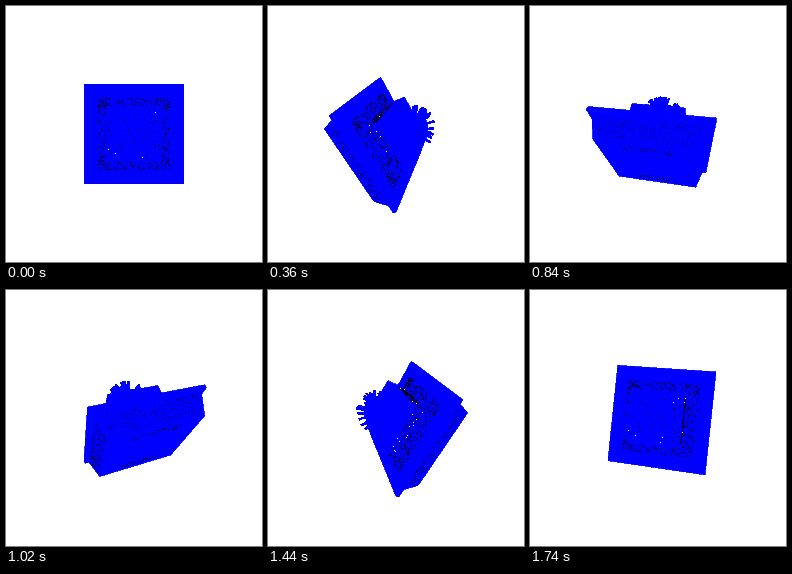
An HTML page for the animation above (1.8 s loop, 256x256 px).

```html
<!DOCTYPE html>
<html>
<head>
<meta charset="utf-8">
<style>
html, body { margin: 0; width: 100%; height: 100%; overflow: hidden; background: #fff; }
svg { display: block; width: 100%; height: 100%; }
</style>
</head>
<body>
<svg viewBox="0 0 256 256" shape-rendering="crispEdges"></svg>
<script>
const LOOP = 1800, STEP = 60, CAMERA = 220, FOCAL = 231;
const AXIS_Y = Math.sqrt(3) / 2, AXIS_Z = 0.5;
const BLUE = '#00f', DIM = '#0000b0', DARK = '#000060', BLACK = '#000', WHITE = '#fff';
const svg = document.querySelector('svg');

let seed = 7;
function random(lo = 0, hi = 1) {
  seed = (seed * 1664525 + 1013904223) >>> 0;
  return lo + (hi - lo) * seed / 4294967296;
}
const repeat = (count, make) => Array.from({ length: count }, (_, i) => make(i));

// Turn a point about the tilted axis (0, AXIS_Y, AXIS_Z).
function turn([x, y, z], angle) {
  const c = Math.cos(angle), s = Math.sin(angle);
  const along = (1 - c) * (AXIS_Y * y + AXIS_Z * z);
  return [
    c * x + s * (AXIS_Y * z - AXIS_Z * y),
    c * y + s * AXIS_Z * x + along * AXIS_Y,
    c * z - s * AXIS_Y * x + along * AXIS_Z
  ];
}
function project(point, angle) {
  const [x, y, z] = turn(point, angle);
  const k = FOCAL / (CAMERA - z);
  return [128 + x * k, 128 - y * k];
}

const square = (half, z) => [[half, half, z], [-half, half, z], [-half, -half, z], [half, -half, z]];
const ring = (radius, z) => repeat(12, i => [radius * Math.cos(i * Math.PI / 6), radius * Math.sin(i * Math.PI / 6), z]);
const quarter = ([x, y, z], n) => n ? quarter([-y, x, z], n - 1) : [x, y, z];

function hull(points) {
  const sorted = points.slice().sort((a, b) => a[0] - b[0] || a[1] - b[1]);
  const half = list => {
    const out = [];
    for (const p of list) {
      while (out.length > 1) {
        const [a, b] = out.slice(-2);
        if ((b[0] - a[0]) * (p[1] - a[1]) - (b[1] - a[1]) * (p[0] - a[0]) > 0) break;
        out.pop();
      }
      out.push(p);
    }
    return out.slice(0, -1);
  };
  return [...half(sorted), ...half(sorted.reverse())];
}

const fmt = p => p.map(v => v.toFixed(2)).join(' ');

function solid(points) {
  return angle => {
    const d = 'M' + hull(points.map(p => project(p, angle))).map(fmt).join('L') + 'Z';
    return `<path d="${d}" fill="${BLUE}" stroke="${BLUE}" stroke-width=".8"/>`;
  };
}

// Specks show only while their face is turned far enough towards the camera.
function specks(normal, offset, points, palette, minFacing = 0) {
  const colors = points.map(() => palette[Math.floor(random(0, palette.length))]);
  return angle => {
    const facing = turn(normal, angle)[2];
    if (facing < minFacing || CAMERA * facing <= offset) return '';
    return [...new Set(palette)].map(color => {
      const d = points.filter((_, i) => colors[i] === color)
        .map(p => `M${project(p, angle).map(Math.floor).join(' ')}h1v1h-1z`).join('');
      return `<path d="${d}" fill="${color}"/>`;
    }).join('');
  };
}

function walls(count, make, offset, palette) {
  return repeat(4, n => specks(quarter([1, 0, 0], n), offset,
    repeat(count, () => quarter(make(), n)), palette));
}

function twigs(count) {
  const lines = repeat(count, () => {
    const a = random(0, Math.PI * 2), lift = random(0.15, 1), r = Math.sqrt(1 - lift * lift);
    const at = (k, turnBy = 0) => [22 * k * r * Math.cos(a + turnBy), 22 * k * r * Math.sin(a + turnBy), 15 + 25 * lift * k];
    return [at(0.5), at(0.85), at(1, random(-0.2, 0.2))];
  });
  return angle => {
    const d = lines.map(l => 'M' + l.map(p => fmt(project(p, angle))).join('L')).join('');
    return `<path d="${d}" fill="none" stroke="${BLUE}" stroke-width="2.6"/>`;
  };
}

const UP = [0, 0, 1], DOWN = [0, 0, -1];
const SHADE = [DIM, DIM, DARK], DEEP = [DIM, DARK, DARK, BLACK];
const GAPS = repeat(18, i => i ? [BLACK, DARK, DIM][i % 3] : WHITE);

const bandDots = repeat(640, i => quarter([random(25, 36), random(-36, 36), -10], i % 4));
const roofDots = repeat(110, () => [random(-23, 23), random(-23, 23), 15]);
const underDots = repeat(90, i => [random(-22, 22), random(26, 35) * (i % 2 ? 1 : -1), -33]);

function slopeDot() {
  const z = random(-31, -15);
  return [46 + (z + 13) * 0.27, random(-40, 40), z];
}

// Groups run from the lowest to the highest part of the model.
const groups = [
  [solid([...square(46, -13), ...square(40.5, -33.3)]),
   ...walls(260, slopeDot, 46, SHADE),
   specks(DOWN, 33, underDots, DEEP)],
  [solid([...square(49.5, -10), ...square(49.5, -13)]),
   specks(UP, -10, bandDots, DEEP)],
  [solid([...square(24.4, -10), ...square(24.4, 15)]),
   ...walls(200, () => [24, random(-23, 23), random(-10, 3)], 24, GAPS),
   specks(UP, 15, roofDots, GAPS, 0.7)],
  [solid([...ring(16, 15), ...ring(13, 25), ...ring(6, 31)]), twigs(32),
   specks(UP, 15, repeat(30, () => [random(-13, 13), random(-13, 13), 25]), DEEP, 0.7)]
];

function draw(time) {
  const angle = Math.floor(time % LOOP / STEP) * STEP / LOOP * 2 * Math.PI;
  const fromAbove = CAMERA * turn(UP, angle)[2] > -10;
  const order = fromAbove ? groups : groups.slice().reverse();
  svg.innerHTML = order.flat().map(part => part(angle)).join('');
}

const start = performance.now();
function tick() {
  draw(performance.now() - start);
  requestAnimationFrame(tick);
}
tick();
</script>
</body>
</html>
```
